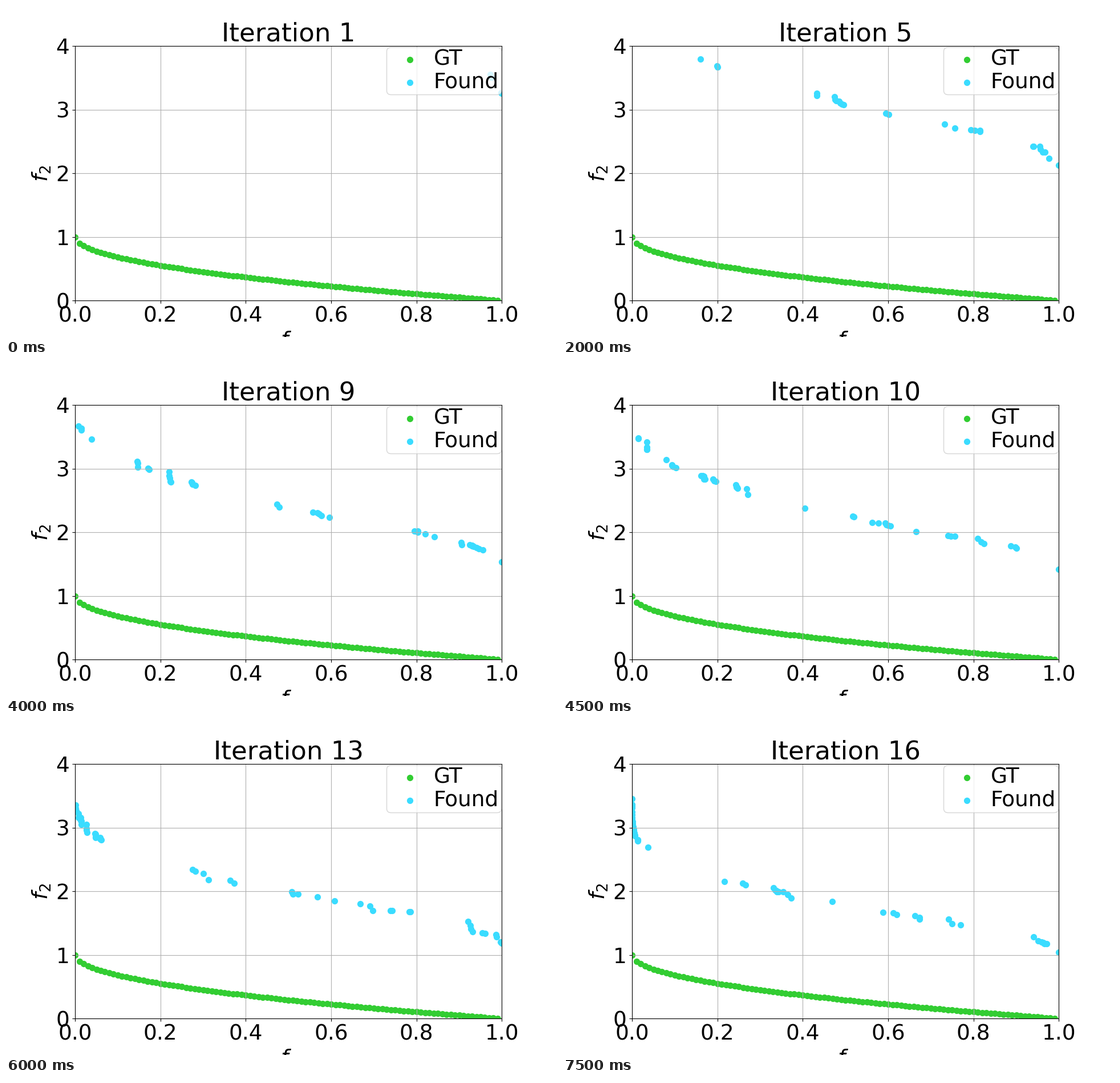
Animation, 966 px wide and 580 px high, one loop 8 s. Source, as a matplotlib script:

```python
import matplotlib.pyplot as plt
import numpy as np
from matplotlib.animation import FuncAnimation

WIDTH, HEIGHT, DPI = 966, 580, 100
ITERATIONS = 16
GREEN, CYAN = "#32cd32", "#3adcff"
DOT = 50


def front(x, it):
    """Height of the found front, sinking towards the true one."""
    floor = .8 + 2.45 * np.exp((1 - it) / 6.5)
    slope = 2.6 - .055 * it
    drop = .2 + .5 / it
    return floor + slope * (1 - np.sqrt(x)) + drop * (1 - x**20)


def found(it):
    """Clustered points in descending steps along the front."""
    rng = np.random.default_rng(it)
    count = int(56 * (1 - np.exp(-(it / 6.5)**1.3)))
    start = .95 * .55**(it - 1)
    centres = rng.beta(max(.3, 1 - .045 * it), .7, count // 2 + 1)
    x = rng.choice(centres, count - 1) * (1 - rng.uniform(0, .04, count - 1))
    x = np.sort(np.r_[start + (1 - start) * x, 1])
    pole = .5 * np.exp(-x / .004) * rng.uniform(0, 1, count)
    y = front(x, it) + pole + rng.normal(0, .035, count)
    y = np.maximum(y, front(1, it))
    return np.column_stack([x, np.sort(y)[::-1]])


plt.rcParams.update({"font.family": "DejaVu Sans", "font.size": 27})
fig, ax = plt.subplots(figsize=(WIDTH / DPI, HEIGHT / DPI), dpi=DPI)
fig.subplots_adjust(left=121.1 / WIDTH, right=869.4 / WIDTH,
                    bottom=63.8 / HEIGHT, top=509.9 / HEIGHT)

gt = np.arange(100) / 100
ax.scatter(gt, 1 - np.sqrt(gt), s=DOT, color=GREEN, label="GT")
dots = ax.scatter([], [], s=DOT, color=CYAN, label="Found")
ax.set(xlim=(0, 1), ylim=(0, 4), xlabel="$f_1$", ylabel="$f_2$",
       yticks=range(5))
ax.grid(True)
ax.legend(loc="upper right", borderpad=.1, labelspacing=.1,
          handletextpad=.1, borderaxespad=.05)
title = ax.set_title("Iteration 1")


def update(i):
    title.set_text(f"Iteration {i + 1}")
    dots.set_offsets(found(i + 1))
    return dots, title


anim = FuncAnimation(fig, update, frames=ITERATIONS, interval=500,
                     repeat=True, repeat_delay=0)
plt.show()
```
